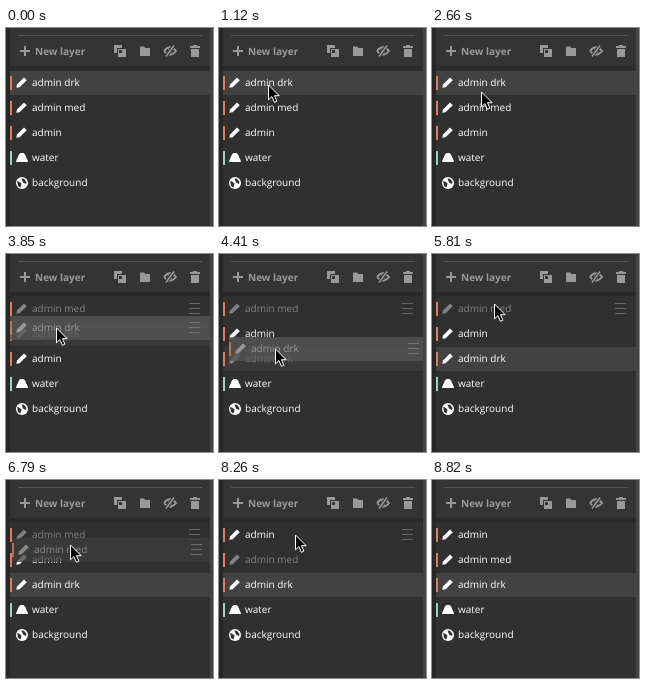
An HTML page with a canvas for the animation above (9170 ms loop, 207 by 198 pixels).

```html
<!DOCTYPE html>
<html lang="en">
<head>
<meta charset="utf-8">
<title>Reordering layers</title>
<style>
html, body { margin: 0; width: 100%; height: 100%; overflow: hidden; background: #303030; }
canvas { display: block; }
</style>
</head>
<body>
<canvas id="stage" width="207" height="198"></canvas>
<script>
const ctx = document.getElementById('stage').getContext('2d');
const LOOP = 9170, TICK = 70, TOP = 42, ROW = 25;
const ORANGE = '#d9805f', TEAL = '#9fd5bd', GREY = '#999', PANEL = '#303030', HEAD = '#343434';

const layers = {
  drk: { text: 'admin drk', icon: pencil, bar: ORANGE },
  med: { text: 'admin med', icon: pencil, bar: ORANGE },
  admin: { text: 'admin', icon: pencil, bar: ORANGE },
  water: { text: 'water', icon: slope, bar: TEAL },
  back: { text: 'background', icon: globe }
};

// The pointer rests between moves and hovers from its third move on
const entry = { x: 90, y: 4 };
const moves = [
  { from: 490, to: 1120, x: 49, y: 56 },
  { from: 1890, to: 2170, x: 49, y: 66 },
  { from: 2590, to: 2870, x: 50, y: 54 },
  { from: 3360, to: 3850, x: 50, y: 73 },
  { from: 3850, to: 4480, x: 57, y: 97 },
  { from: 4970, to: 5810, x: 62, y: 49 },
  { from: 6440, to: 7070, x: 65, y: 76 },
  { from: 8190, to: 8750, x: 103, y: 0, power: 2.5 }
];
const shown = t => t >= 490 && t < 8820;
const hovering = t => t >= 2730 && shown(t);

const drags = [
  { id: 'drk', from: 3430, to: 4760 },
  { id: 'med', from: 6510, to: 7350 }
];

const clamp = (v, a = 0, b = 1) => Math.min(b, Math.max(a, v));

function pointer(t) {
  let { x, y } = entry;
  for (const m of moves) {
    const k = clamp((t - m.from) / (m.to - m.from));
    const eased = 1 - (1 - k) ** (m.power || 1);
    x += (m.x - x) * eased;
    y += (m.y - y) * eased;
  }
  return { x: Math.round(x), y: Math.round(y) };
}

// Replays the loop up to time t: layer order, hovered row and row fades
function stateAt(t) {
  const order = Object.keys(layers), dim = order.map(() => 0);
  let hover = -1, drag;
  for (let s = 0; s <= t; s += TICK) {
    const row = Math.floor((pointer(s).y - TOP) / ROW);
    dim.forEach((d, i) => dim[i] = clamp(d + (i === hover ? 0.5 : -0.5)));
    drag = drags.find(d => s >= d.from && s < d.to);
    if (drag) {
      order.splice(order.indexOf(drag.id), 1);
      order.splice(clamp(row, 0, 4), 0, drag.id);
    } else {
      hover = hovering(s) ? row : -1;
    }
  }
  return { order, dim, hover, drag };
}

function rect(color, x, y, w, h) {
  ctx.fillStyle = color;
  ctx.fillRect(x, y, w, h);
}

function poly(color, ...pts) {
  ctx.beginPath();
  for (let i = 0; i < pts.length; i += 2) ctx.lineTo(pts[i], pts[i + 1]);
  ctx.closePath();
  ctx.fillStyle = color;
  ctx.fill();
}

function disc(color, x, y, r) {
  ctx.beginPath();
  ctx.arc(x, y, r, 0, 7);
  ctx.fillStyle = color;
  ctx.fill();
}

function line(color, width, x1, y1, x2, y2) {
  ctx.beginPath();
  ctx.moveTo(x1, y1);
  ctx.lineTo(x2, y2);
  ctx.strokeStyle = color;
  ctx.lineWidth = width;
  ctx.stroke();
}

function label(text, x, y, color, weight = 400) {
  ctx.font = weight + ' 10px "Open Sans", "Noto Sans", sans-serif';
  ctx.textRendering = 'geometricPrecision';
  ctx.fillStyle = color;
  ctx.fillText(text, x, y);
}

function at(x, y, draw) {
  ctx.save();
  ctx.translate(x, y);
  draw();
  ctx.restore();
}

// Row icons, relative to the top of the row
function pencil() {
  poly('#fff', 10.3, 17.7, 11, 14.6, 18, 7.6, 20.8, 10.3, 13.6, 17.2);
}

function slope() {
  poly('#fff', 10, 17, 10.5, 15, 13, 9.5, 14.5, 8, 17.5, 8, 19, 9.5, 21.5, 15, 22, 17);
}

function globe() {
  disc('#fff', 16, 13, 6);
  poly(PANEL, 11.2, 11, 13, 11.5, 15.5, 13.5, 14.5, 17.5, 12, 16);
  poly(PANEL, 15.5, 8.5, 18, 8.8, 20.5, 12, 20, 14, 17, 12.5);
}

function drawRow(id, alpha, handle) {
  const { text, icon, bar } = layers[id];
  if (bar) rect(bar, 4, 6, 2, 14);
  ctx.save();
  ctx.globalAlpha *= alpha;
  icon();
  label(text, 26, 16, '#fff');
  ctx.restore();
  if (handle) for (let y = 7; y < 20; y += 5) rect(handle, 183, y, 11, 1);
}

function header() {
  rect(HEAD, 4, 0, 200, 38);
  rect('#2a2a2a', 4, 38, 200, 4);
  rect('#555', 12, 7, 184, 1);
  rect(GREY, 14, 22, 10, 2);
  rect(GREY, 18, 18, 2, 10);
  label('New layer', 29, 27, GREY, 700);

  // Duplicate
  rect(GREY, 108, 17, 8, 8);
  rect(HEAD, 111, 20, 10, 10);
  rect(GREY, 112, 21, 8, 8);
  rect(HEAD, 113, 22, 3, 3);
  // Folder
  poly(GREY, 134, 18.5, 138, 18.5, 139.5, 20, 144, 20, 144, 28, 134, 28);
  // Hidden eye
  ctx.beginPath();
  ctx.moveTo(158, 23);
  ctx.quadraticCurveTo(164, 15.5, 170, 23);
  ctx.quadraticCurveTo(164, 30.5, 158, 23);
  ctx.strokeStyle = GREY;
  ctx.lineWidth = 2;
  ctx.stroke();
  disc(GREY, 164, 23, 2.2);
  line(HEAD, 3.5, 160, 28.5, 168, 17.5);
  line(GREY, 1.5, 160, 28.5, 168, 17.5);
  // Bin
  rect(GREY, 184, 18, 10, 2);
  rect(GREY, 187, 17, 4, 1);
  rect(GREY, 185, 21, 8, 8);
}

function cursor() {
  ctx.beginPath();
  for (const [x, y] of [[0.5, 1], [0.5, 15.8], [3.9, 12.6], [6.4, 18.3], [8.9, 17.2], [6.5, 11.7], [11.2, 11.7]])
    ctx.lineTo(x, y);
  ctx.closePath();
  ctx.fillStyle = '#000';
  ctx.fill();
  ctx.strokeStyle = '#fff';
  ctx.lineWidth = 1;
  ctx.stroke();
}

function draw(t) {
  const { order, dim, hover, drag } = stateAt(t);
  const tip = pointer(t);

  rect(PANEL, 0, 0, 207, 198);
  rect('#272727', 0, 0, 4, 198);
  header();

  order.forEach((id, row) => at(0, TOP + row * ROW, () => {
    const held = drag && drag.id === id;
    if (id === 'drk') rect(held ? '#393939' : '#424242', 4, 1, 200, ROW - 1);
    drawRow(id, held ? 0.38 : 1 - 0.6 * dim[row], row === hover && '#686868');
  }));

  if (drag) {
    const grab = pointer(drag.from - TICK);
    at(tip.x - grab.x, TOP + tip.y - grab.y, () => {
      ctx.globalAlpha = 0.75;
      rect(drag.id === 'drk' ? '#575757' : '#3d3d3d', 4, 1, 200, ROW - 1);
      drawRow(drag.id, 0.55, '#808080');
    });
  }

  rect('#444', 204, 0, 3, 198);
  if (shown(t)) at(tip.x, tip.y, cursor);
}

function frame(now) {
  draw(Math.floor(now % LOOP / TICK) * TICK);
  requestAnimationFrame(frame);
}
requestAnimationFrame(frame);
</script>
</body>
</html>
```
